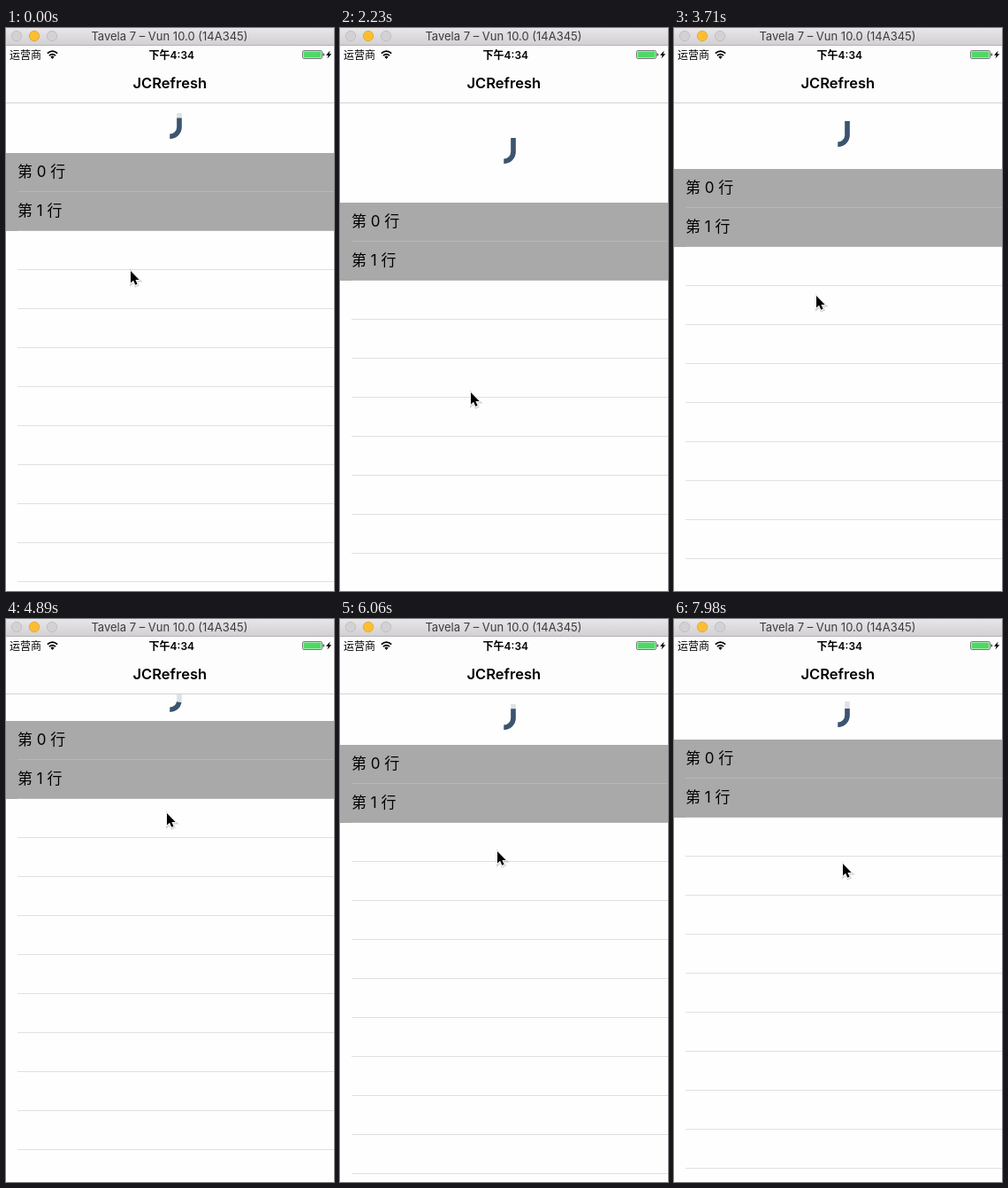
Animation of 371x635 px, one loop 8000 ms. Source, as an HTML page:

```html
<!DOCTYPE html>
<html lang="zh">
<head>
<meta charset="utf-8">
<title>JCRefresh</title>
<style>
  html, body { margin: 0; width: 100%; height: 100%; overflow: hidden; background: #fefefe; }
  svg { display: block; width: 371px; height: 635px; }
  text { font-family: Inter, "Noto Sans CJK SC", "Noto Sans CJK", sans-serif; fill: #000; }
  .mid { text-anchor: middle; }
  .row { font-size: 17px; }
  .hook { fill: none; stroke: #dfe1e5; stroke-width: 5.6; }
  .fill { stroke: #3c546f; }
</style>
</head>
<body>
<svg viewBox="0 0 371 635">
  <defs>
    <linearGradient id="chrome" x2="0" y2="1">
      <stop stop-color="#e8e6e8"/>
      <stop offset="1" stop-color="#d2d0d2"/>
    </linearGradient>
    <path id="arrow" d="M0 0V13.6L3.1 10.8L5.3 15.8L7.6 14.8L5.4 9.9H9.7Z"/>
  </defs>
  <rect width="371" height="635" fill="#fefefe"/>

  <g id="loader">
    <path class="hook" d="M185.3 26.2A10.6 10.4 0 0 0 196 15.8V0"/>
    <path class="hook fill" id="progress" pathLength="100" d="M185.3 26.2A10.6 10.4 0 0 0 196 15.8V0"/>
  </g>

  <g id="table">
    <rect width="371" height="88" fill="#a9a9a9"/>
    <g id="lines"></g>
    <text class="row" x="13" y="27">第 0 行</text>
    <text class="row" x="13" y="71">第 1 行</text>
  </g>

  <rect y="20" width="371" height="64" fill="#fdfdfd"/>
  <rect y="84" width="371" height="1" fill="#d2d2d2"/>
  <text class="mid" x="185.3" y="68" font-size="16.5" font-weight="600">JCRefresh</text>

  <text x="4" y="34.5" font-size="12">运营商</text>
  <g fill="none" stroke="#000" stroke-width="1.8">
    <path d="M46.8 28.6Q52.5 23.6 58.2 28.6"/>
    <path d="M48.9 31.2Q52.5 28 56.1 31.2"/>
    <path d="M50.4 32.4Q52.5 30.8 54.6 32.4L52.5 35Z" fill="#000" stroke="none"/>
  </g>
  <text class="mid" x="187.3" y="34.5" font-size="12" font-weight="600">下午4:34</text>
  <rect x="335.5" y="25.5" width="22" height="9" rx="1.6" fill="#fdfdfd" stroke="#555" stroke-width=".8"/>
  <rect x="336.6" y="26.6" width="19.8" height="6.8" rx=".6" fill="#4cd964"/>
  <path d="M358.6 28.3q1.5.2 1.5 1.7t-1.5 1.7Z" fill="#333"/>
  <path d="M366.6 25.6L362 30.7H364.6L363.4 34.6L368.2 29.2H365.5Z"/>

  <rect width="371" height="19" fill="url(#chrome)"/>
  <rect y="19" width="371" height="1" fill="#b4b2b4"/>
  <g fill="#d3d1d3" stroke="#bcbabc" stroke-width=".8">
    <circle cx="12" cy="9" r="5.7"/>
    <circle cx="32" cy="9" r="5.7" fill="#fdbe30" stroke="#dfa236"/>
    <circle cx="52" cy="9" r="5.7"/>
  </g>
  <text class="mid" x="185" y="14" font-size="13" style="fill:#3c3c3c">Tavela 7 – Vun 10.0 (14A345)</text>

  <g id="cursor">
    <use href="#arrow" x=".4" y="1" fill="none" stroke="#000" stroke-opacity=".16" stroke-width="3"/>
    <use href="#arrow" stroke="#fff" stroke-width="1.8" stroke-linejoin="round"/>
    <use href="#arrow"/>
  </g>
</svg>
<script>
  const LOOP = 8000, NAV = 84, FULL_PULL = 69, ROW = 44;

  // step, start in ms, table top, cursor x, cursor y
  const keys = [
    [0, 0, 141, 141, 274],
    [2, 300, 147, 141, 290],
    [7, 1030, 163, 143, 327],
    [8, 1180, 163, 143, 327],
    [12, 1780, 186, 146, 385],
    [14, 2080, 186, 146, 385],
    [15, 2230, 197, 148, 411],
    [18, 2670, 206, 151, 432],
    [20, 2960, 196, 155, 402],
    [22, 3260, 163, 160, 314],
    [24, 3560, 163, 160, 314],
    [25, 3710, 159, 161, 302],
    [27, 4000, 126, 172, 240],
    [29, 4300, 126, 172, 240],
    [33, 4890, 115, 182, 219],
    [37, 5470, 97.5, 184, 184],
    [41, 6060, 142, 178, 262],
    [42, 6210, 141, 178, 261],
    [45, 6650, 109, 180, 208],
    [46, 6800, 102, 182, 194],
    [48, 7090, 98, 184, 182],
    [50, 7390, 95, 184, 178],
    [53, 7830, 119, 188, 232],
    [54, 7980, 136, 191, 276]
  ];

  const poses = [];
  for (let i = 1; i < keys.length; i++) {
    const a = keys[i - 1], b = keys[i];
    for (let n = a[0]; n < b[0]; n++) {
      const k = (n - a[0]) / (b[0] - a[0]);
      poses.push(a.map((v, j) => v + (b[j] - v) * k));
    }
  }
  poses.push(keys[keys.length - 1]);

  const el = id => document.getElementById(id);
  const move = (id, x, y) => el(id).setAttribute("transform", `translate(${x} ${y})`);

  for (let n = 1; n <= 12; n++) {
    const line = document.createElementNS("http://www.w3.org/2000/svg", "rect");
    const attrs = { x: 13, y: n * ROW - 1, width: 358, height: 1, fill: n < 3 ? "#b7b7b9" : "#e0e0e2" };
    for (const name in attrs) line.setAttribute(name, attrs[name]);
    el("lines").append(line);
  }

  function draw() {
    const t = performance.now() % LOOP;
    let i = poses.length - 1;
    while (i && Math.round(poses[i][1] / 10) * 10 > t) i--;
    const [, , rawTop, x, y] = poses[i];
    const top = Math.round(rawTop);

    move("table", 0, top);
    // the loader rides with the table, then stays centred in the gap
    move("loader", 0, Math.floor(Math.min(top - 39, (NAV + top) / 2 - 16.5)));
    const done = Math.min(1, (top - NAV) / FULL_PULL) * 100;
    el("progress").setAttribute("stroke-dasharray", `${done} 200`);
    move("cursor", Math.round(x), Math.round(y));
    requestAnimationFrame(draw);
  }
  draw();
</script>
</body>
</html>
```
